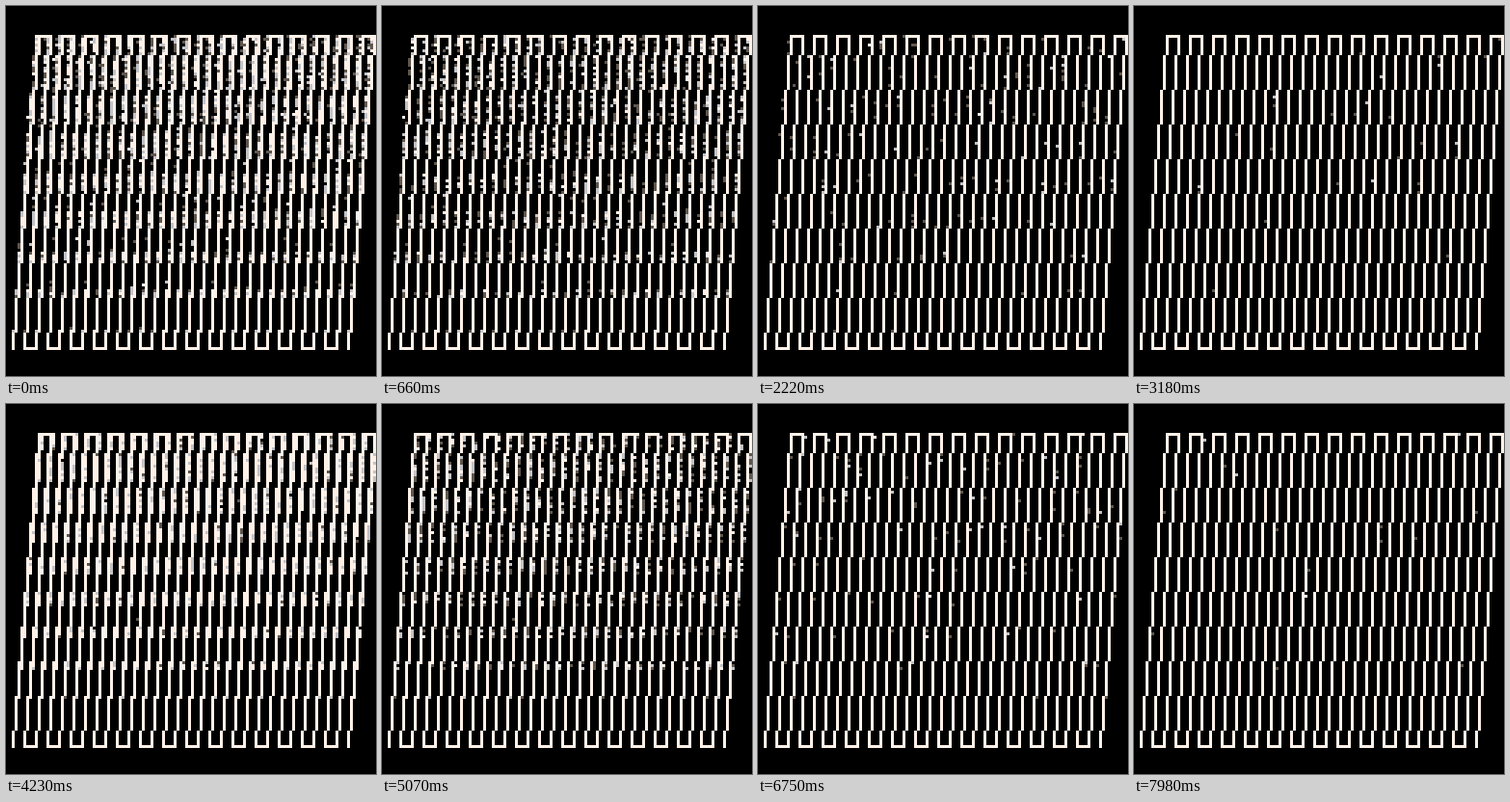
Recreate the animation shown at these times as an HTML page with a canvas. Size 384 by 384 pixels, loop 8 s.

```html
<!DOCTYPE html>
<html lang="en">
<head>
<meta charset="utf-8">
<title>Leaning serpentine</title>
<style>
  html, body { margin: 0; width: 100%; height: 100%; overflow: hidden; background: #000; }
  canvas { display: block; width: 100vw; height: 100vh; image-rendering: pixelated; }
</style>
</head>
<body>
<canvas id="stage" width="128" height="128"></canvas>
<script>
const ctx = document.getElementById('stage').getContext('2d');
const LOOP = 8000, TICK = 30;
const TOP = 10, BOTTOM = 118, LEFT = 2, GAP = 4, WALLS = 30;
const SHADES = ['#fff1e8', '#c2c3c7', '#5f574f'];
const FADE_RATE = 2.05 / 1000; // shade drops per ms and pixel

// The lean of the line over time: from, to (ms) and pixels of shift at the top
const POSES = [
  { lean: 7, from: -4000, to: -2250 },
  { lean: 8, from: -2250, to: -430 },
  { lean: 9, from: -430, to: 3930 },
  { lean: 10, from: 3930, to: 4020 },
  { lean: 9, from: 4020, to: LOOP }
];

function randomFor(seed) {
  let s = seed | 0;
  return () => {
    s = (s + 0x6d2b79f5) | 0;
    let r = Math.imul(s ^ (s >>> 15), 1 | s);
    r = (r + Math.imul(r ^ (r >>> 7), 61 | r)) ^ r;
    return ((r ^ (r >>> 14)) >>> 0) / 4294967296;
  };
}

// Ages at which an abandoned pixel turns one shade darker
function fadeTimes(x, y) {
  const rnd = randomFor(Math.imul(y * 128 + x + 1, 2654435761));
  let age = 0;
  return SHADES.map(() => age += -Math.log(1 - rnd()) / FADE_RATE);
}

function serpentine(lean) {
  const cells = [];
  const add = (x, y) => cells.push({ x, y, fade: fadeTimes(x, y) });
  const height = BOTTOM - TOP;
  for (let k = 0; k < WALLS; k++) {
    const foot = LEFT + GAP * k;
    for (let y = TOP; y <= BOTTOM; y++) {
      add(foot + Math.round(lean * (BOTTOM - y) / height), y);
    }
    if (k === WALLS - 1) continue;
    const atTop = k % 2 === 0;
    for (let i = 1; i < GAP; i++) {
      add(foot + i + (atTop ? lean : 0), atTop ? TOP : BOTTOM);
    }
  }
  return cells;
}

for (const pose of POSES) pose.cells = serpentine(pose.lean);

function draw(t) {
  ctx.fillStyle = '#000';
  ctx.fillRect(0, 0, 128, 128);
  for (const { from, to, cells } of POSES) {
    if (t < from) continue;
    const age = t - to;
    for (const { x, y, fade } of cells) {
      const level = fade.filter(limit => age >= limit).length;
      if (level === SHADES.length) continue;
      ctx.fillStyle = SHADES[level];
      ctx.fillRect(x, y, 1, 1);
    }
  }
}

const start = performance.now();
let shown = -1;
function tick() {
  const t = (performance.now() - start) % LOOP;
  const step = Math.floor(t / TICK);
  if (step !== shown) {
    shown = step;
    draw(step * TICK);
  }
  requestAnimationFrame(tick);
}
tick();
</script>
</body>
</html>
```
